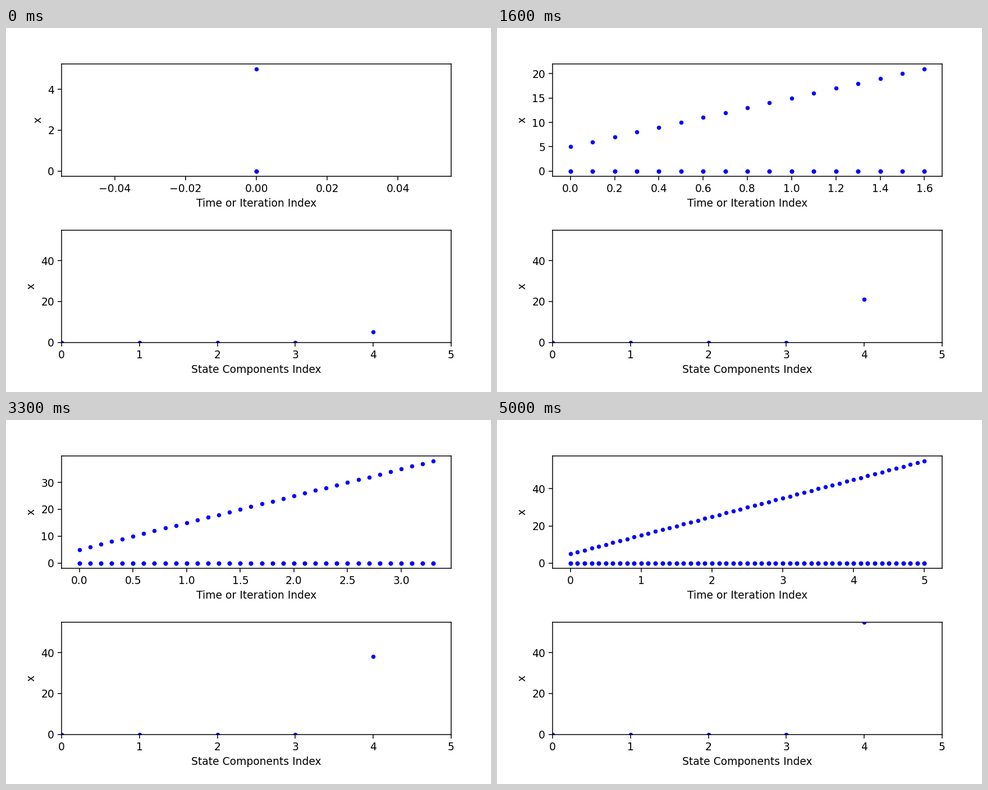
These frames come from a looping animation (864x648 px, 5.1 s). A matplotlib script:

```python
import numpy as np
import matplotlib.pyplot as plt
from matplotlib.animation import FuncAnimation

STEPS = 51
DT = 0.1
SIZE = 5

fig, (ax_time, ax_state) = plt.subplots(2, 1, figsize=(6.4, 4.8), dpi=135)
# Margins are settled on the empty axes, before labels and limits.
fig.tight_layout(pad=3.0)

ax_time.set_xlabel("Time or Iteration Index")
ax_time.set_ylabel("x")
ax_state.set_xlabel("State Components Index")
ax_state.set_ylabel("x")
ax_state.set_xlim(0, 5)
ax_state.set_ylim(0, 55)

history, = ax_time.plot([], [], "b.")
current, = ax_state.plot([], [], "b.")

# Only the last state component grows, by one per step.
times = DT * np.arange(STEPS)
states = np.zeros((STEPS, SIZE))
states[:, -1] = 5 + np.arange(STEPS)


def update(step):
    shown = step + 1
    history.set_data(np.repeat(times[:shown], SIZE), states[:shown].ravel())
    ax_time.relim()
    ax_time.autoscale_view()
    current.set_data(np.arange(SIZE), states[step])
    return history, current


anim = FuncAnimation(fig, update, frames=STEPS, interval=100,
                     init_func=lambda: update(0), repeat=True, repeat_delay=0)
plt.show()
```
